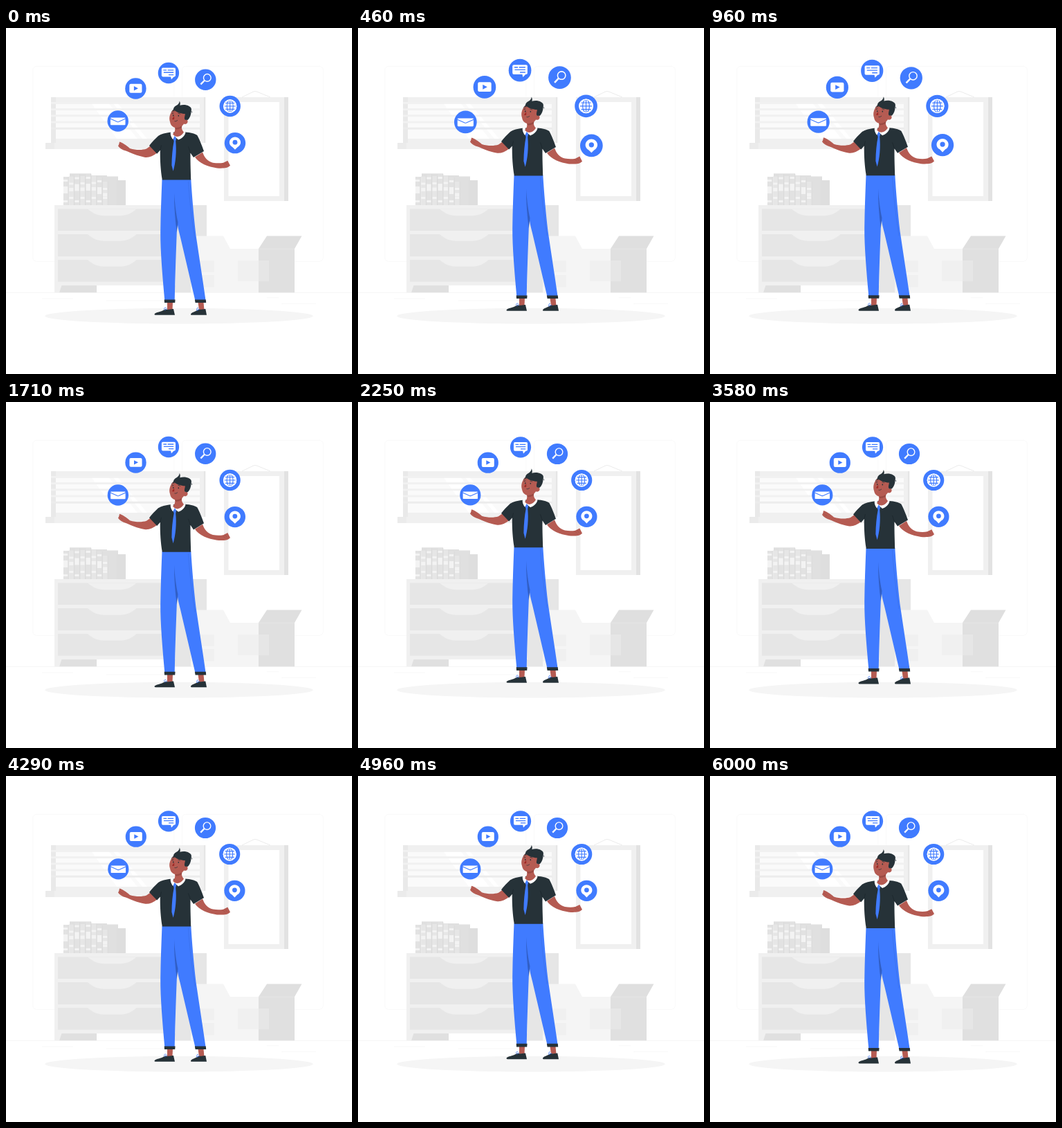
Animation of 500x500 px, one loop 6040 ms. Source, as an HTML page with a canvas:

```html
<!DOCTYPE html>
<html lang="en">
<head>
<meta charset="utf-8">
<title>Juggling icons</title>
<style>
html, body { margin: 0; width: 100%; height: 100%; overflow: hidden; background: #fff; }
canvas { display: block; width: 500px; height: 500px; }
</style>
</head>
<body>
<canvas id="stage"></canvas>
<script>
const LOOP = 6040, STEPS = 145, CYCLE = 6000;
const BLUE = '#407bff', DARK = '#263238', SKIN = '#b55b52', SHADE = '#9a4a43', WHITE = '#fff';
const canvas = document.getElementById('stage');
const ratio = Math.max(1, window.devicePixelRatio || 1);
canvas.width = canvas.height = 500 * ratio;
let c = canvas.getContext('2d');

function fill(d, color) {
  c.fillStyle = color;
  c.fill(new Path2D(d));
}
function line(d, color, width) {
  c.strokeStyle = color;
  c.lineWidth = width;
  c.stroke(new Path2D(d));
}
function box(x1, y1, x2, y2, color) {
  c.fillStyle = color;
  c.fillRect(x1, y1, x2 - x1, y2 - y1);
}
function round(x1, y1, x2, y2, r, color) {
  c.beginPath();
  c.roundRect(x1, y1, x2 - x1, y2 - y1, r);
  c.fillStyle = color;
  c.fill();
}
function oval(x, y, rx, ry, color) {
  c.beginPath();
  c.ellipse(x, y, rx, ry, 0, 0, 7);
  c.fillStyle = color;
  c.fill();
}

function drawWall() {
  c.strokeStyle = '#f8f8f8';
  c.lineWidth = 0.8;
  for (const x of [38.8, 254.3]) {
    c.beginPath();
    c.roundRect(x, 55.3, 204, 282, 5.5);
    c.stroke();
  }
  box(0, 382, 500, 382.6, '#f1f1f1');
  box(52, 390.8, 97, 391.3, '#f1f1f1');
  box(145, 393.8, 238, 394.3, '#f1f1f1');
  box(398, 398.2, 448, 398.7, '#f1f1f1');
  box(377, 389.6, 394, 390.1, '#f1f1f1');
}

function drawWindow() {
  box(65, 100, 288.3, 166, '#e6e6e6');
  box(66.5, 100, 286, 166, '#f0f0f0');
  box(57, 166, 281, 175, '#f0f0f0');
  box(57, 166, 70, 175, '#ebebeb');
  box(65, 100, 72, 166, '#e9e9e9');
  box(72, 107, 280, 160, '#fafafa');
  fill('M122 107H147L190 160H160Z M153 107H160L204 160H197Z', WHITE);
  for (let i = 0; i < 5; i++) {
    const y = 107 + i * 9.2;
    box(65, y, 281, y + 2.8, i === 4 ? '#ececec' : '#f1f1f1');
  }
}

function drawFrame() {
  line('M341 100L357 92.2Q360 90.8 363 92.2L382 100', '#e9e9e9', 0.9);
  box(315, 100, 408, 250, '#e2e2e2');
  box(315, 100, 402, 250, '#f0f0f0');
  box(321.5, 107, 395, 243, WHITE);
}

function drawBooks() {
  box(146, 214.5, 162, 256, '#e0e0e0');
  box(160, 220, 173, 256, '#dedede');
  box(92, 210.3, 123, 256, '#dfdfdf');
  box(123, 213, 146, 256, '#e0e0e0');
  const tops = [215, 214.5, 211.5, 214, 211, 213.5, 216, 222];
  tops.forEach((top, i) => {
    const x = 83 + i * 8.15;
    box(x, top, x + 7.6, 256, i % 2 ? '#e6e6e6' : '#e2e2e2');
    box(x + 6.8, top, x + 7.6, 256, '#d8d8d8');
    const low = i % 2 * 5;
    box(x, top + 4 + low, x + 6.2, top + 7 + low, '#f3f3f3');
    box(x, top + 14 + low / 2, x + 6.2, top + 24 - low / 2, '#f3f3f3');
    box(x, 249 - low, x + 6.2, 252 - low, '#f3f3f3');
  });
}

function drawDresser() {
  box(230, 256, 290, 382.3, '#e6e6e6');
  box(70, 256, 245, 372, '#f0f0f0');
  fill('M70 371H82L77 382.3H70Z', '#f0f0f0');
  fill('M80.5 372H131V382.3H77Z', '#e0e0e0');
  for (const [top, end] of [[261.5, 293], [298, 330], [335, 366.5]]) {
    box(75, top, 240, end, '#e6e6e6');
    c.save();
    c.translate(0, top);
    fill('M118 0H188.5C182 6 174 9.8 165 9.8H142C132 9.8 125 6 118 0Z', '#f0f0f0');
    c.restore();
  }
}

function drawCrates() {
  fill('M267 300.5H314L324 319H365V382.3H267Z', '#f5f5f5');
  box(267, 336, 301, 353, '#f0f0f0');
  box(267, 357, 301, 374.5, '#f0f0f0');
  box(365, 319, 417, 382.3, '#e0e0e0');
  fill('M365 319L377 300.5H427.5L417 319Z', '#dfdfdf');
  line('M365 319.2H417', '#e9e9e9', 0.6);
  box(335, 336, 365, 366, '#f0f0f0');
  box(365, 336, 380, 366, '#e6e6e6');
}

function drawHead() {
  fill('M243 140L255 138C253 144 254 148 257 151C253 158 246 160 241 154C245 150 245 146 243 140Z', SKIN);
  fill('M244 143C249 145 253 142 255 139L254 144C251 147 247 147 245 147Z', SHADE);
  fill('M241 119C237 124 235 130 237 136C238 142 242 145 247 144.5C252 144 256 141 257 139C260 140.5 263 138 262.5 135C262 132 259 132 258 133L262 122L250 115Z', SKIN);
  fill('M242 122C241 117 243 114 246.5 112.3C249 111 250.5 109 250.8 106C252 108.5 252 110.5 251.3 112.3C256 111 261 111.5 264.5 113.5C268 115 268.5 118 267.5 121C267.5 126 265.5 131 262.5 133.5C260.5 133 258.5 134 258 132C257.5 129 259 127 258.8 124.5C253 124.5 246 122 243.5 119.5Z', DARK);
  line('M266 122C268 120 269.5 121.5 268.5 123M242 119C240 119.5 239.5 121.5 240 123', DARK, 0.7);
  oval(241.8, 127, 0.8, 1.1, DARK);
  oval(249.3, 127.4, 0.8, 1.1, DARK);
  line('M239.8 124.4L242.3 123.4M248.5 123.8Q250.5 123.2 252 125', DARK, 0.8);
  fill('M243 127.5C242 129.5 240.5 131 240 132C241 133 242.5 132.8 243.2 132.2Z', '#a02724');
  line('M243.5 135.2Q246 136 248 133.8', DARK, 0.7);
}

function drawMan() {
  fill('M164 165C168 166 174 170 179 174.5C188 177.2 197 177 203 175L210 170L219 180.5C212 186 206 188.2 200 187.2C190 185.6 180 181 174 178.4C168 177 164 174 162 171Q163.5 169 164 165Z', SKIN);
  fill('M273 187L284 180C287 188 291 193 299 195.2C305 196.2 310 196 314 195.3L320.3 192.2L324 199.3C320 203.6 312 203.4 305 203C292 201 279 196 273 187Z', SKIN);
  line('M164 169L169 173M313 196L317 200M316 195L320 199', SHADE, 0.5);

  fill('M233 397H241L240.5 408H233Z M277.5 397H285.5L286.5 408H279Z', SKIN);
  fill('M214.5 414C216 411 224 411.5 230 406.8C234 408.5 238 406.4 242 406.6L244 415.4H216Q214.3 415.4 214.5 414Z', DARK);
  fill('M267 414C268.5 411 273 411.2 278 407C281 408.2 285 406.4 288.3 406.6L290 415.4H268Q266.8 415.4 267 414Z', DARK);
  line('M228 407Q230 402.8 231.5 405.5M229 408.5L233 406M275.5 408.5Q276 403.2 278 405.5M276 409L280 406.6', BLUE, 0.8);

  fill('M225.5 219H267.3C269 245 271 270 274.5 300C279 331 284 362 288.5 394H273.3L252 303C249 291 247.5 285 247.5 278C246 317 244.5 355 243.7 394H229.3C226 357 223 323 223.2 296C223.5 270 224.5 245 225.5 219Z', BLUE);
  fill('M243 239C244 255 246 270 248.5 281L246.8 296C244.5 278 242.8 258 243 239Z', '#315fc6');
  line('M263.5 222C265 250 268.5 277 273 307', '#3a70e8', 0.7);
  fill('M228.7 393H244.6L244.2 397.6H229Z M272.8 393H288.8L289.2 397.6H273.6Z', DARK);

  fill('M238 151.4C231 152 224 154 220 156.5C215 161 211 165.5 207 170.5L218.2 182.2L222.8 177C222.5 191 223.5 207 225.8 220H267.2C267 208 266.4 198 266.5 181L271 187.6L286 178.5C283 170 279.5 161 276.3 155.5C272 152.5 267 151.8 259 151Z', DARK);
  line('M222.8 177L224.5 170M266.5 181L263.5 172', '#1b252a', 0.7);
  fill('M238 150.7L241 149.5C242 153 243 155 245 156.6C250 155 254 151 255.5 148.8L259.5 151.2C258.5 156.5 254 160.3 249 162L244.2 157.8L241 161.5C238.5 158 237 154 238 150.7Z', WHITE);
  fill('M243.8 156.3L246.2 160.2L245.2 164C246.6 179 245.3 195 241.6 207.3L239.4 199C239.5 186 240.8 174 242.7 164L241.6 160.8Z', BLUE);
  drawHead();
}

const glyphs = [
  [162.3, 134.4, () => {
    round(-10.7, -5, 10.7, 5.7, 1.2, WHITE);
    line('M-11 -3.4L-1 1Q0 1.4 1 1L11 -3.4', BLUE, 1.1);
  }],
  [187.8, 87.7, () => {
    round(-9, -6.6, 9, 6.2, 2, WHITE);
    fill('M-2.5 -3.4L3.6 -0.2L-2.5 3Z', BLUE);
  }],
  [235, 65.3, () => {
    round(-10, -7.3, 10, 5.4, 1.8, WHITE);
    fill('M3 5L4 9.2L8 5Z', WHITE);
    line('M-7.5 -4H-2.8M-1.3 -4H7.2M-7 -0.7H7.2M0 2.6H7.2', BLUE, 1.3);
  }],
  [288, 75, () => {
    line('M-1.6 1.2L-6.8 6.6', WHITE, 2.3);
    c.beginPath();
    c.arc(2.5, -2.8, 5.3, 0, 7);
    c.strokeStyle = WHITE;
    c.lineWidth = 1.4;
    c.stroke();
  }],
  [323.2, 113, () => {
    oval(0, 0, 9.6, 9.6, WHITE);
    line('M0 -8.4V8.4M-8.4 0H8.4M-7 -4.4H7M-7 4.4H7', BLUE, 1.1);
    c.beginPath();
    c.ellipse(0, 0, 4.5, 8.6, 0, 0, 7);
    c.stroke();
    c.beginPath();
    c.arc(0, 0, 8.8, 0, 7);
    c.strokeStyle = WHITE;
    c.lineWidth = 1.5;
    c.stroke();
  }],
  [330.4, 165.8, () => {
    fill('M0 9.6L-3.8 5.8C-9 3 -9.3 -3.2 -5.4 -6.6C-2.2 -9.3 2.2 -9.3 5.4 -6.6C9.3 -3.2 9 3 3.8 5.8Z', WHITE);
    oval(0, -1, 3.4, 3.4, BLUE);
  }]
];

function drawIcons(scale) {
  c.save();
  c.translate(246.5, 115.6);
  c.scale(scale, scale);
  c.translate(-246.5, -115.6);
  for (const [x, y, glyph] of glyphs) {
    c.save();
    c.translate(x, y);
    oval(0, 0, 15.1, 15.1, BLUE);
    glyph();
    c.restore();
  }
  c.restore();
}

// Two linear pulses per cycle, then a rest.
const beats = [[0, 1], [600, 1.1], [1800, 1], [2400, 1], [3000, 1.1], [3600, 1], [6000, 1]];
function pulse(t) {
  const i = Math.max(1, beats.findIndex(b => t <= b[0]));
  const [t0, s0] = beats[i - 1], [t1, s1] = beats[i];
  return s0 + (s1 - s0) * (t - t0) / (t1 - t0);
}
// Rises 10 px and returns every 1.5 s at constant speed.
function hover(t) {
  const p = t % 1500 / 750;
  return -10 * Math.min(p, 2 - p);
}

// The still scenery is painted once.
const scenery = document.createElement('canvas');
scenery.width = scenery.height = canvas.width;
const main = c;
c = scenery.getContext('2d');
c.scale(ratio, ratio);
box(0, 0, 500, 500, WHITE);
drawWall();
drawWindow();
drawFrame();
drawBooks();
drawDresser();
drawCrates();
oval(250, 416.2, 193.8, 11.3, '#f5f5f5');
c = main;
c.scale(ratio, ratio);
c.lineCap = 'butt';

function render(now) {
  const step = Math.floor(((now + 5) % LOOP) * STEPS / LOOP);
  const t = (step + 1) * CYCLE / STEPS;
  c.drawImage(scenery, 0, 0, 500, 500);
  c.save();
  c.translate(0, hover(t));
  drawMan();
  c.restore();
  drawIcons(pulse(t));
}

let start = null;
function tick(now) {
  if (start === null) start = now;
  render(now - start);
  requestAnimationFrame(tick);
}
render(0);
requestAnimationFrame(tick);
</script>
</body>
</html>
```
